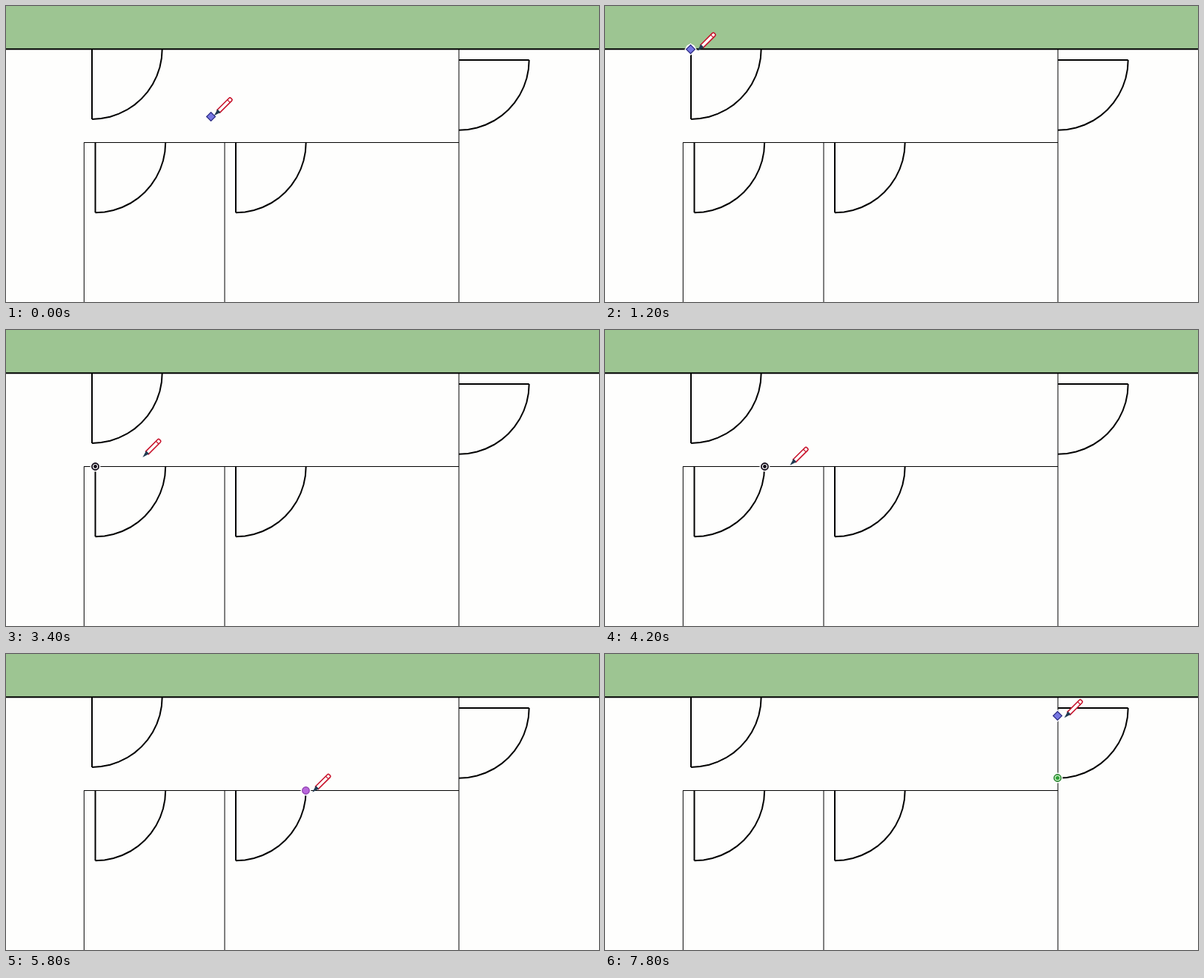
These frames come from a looping animation (800x400 px, 8000 ms). An HTML page with a canvas:

```html
<!DOCTYPE html>
<html lang="en">
<head>
<meta charset="utf-8">
<title>Floor plan doors</title>
<style>
html, body { margin: 0; width: 100%; height: 100%; overflow: hidden; background: #fefefd; }
canvas { display: block; }
</style>
</head>
<body>
<canvas id="stage" width="800" height="400"></canvas>
<script>
const ctx = document.getElementById('stage').getContext('2d');
const LOOP = 8000, STEP = 200;
const RADIUS = 94.7, WALL = 58.2, INNER = 184.5;

// The pencil visits the doors at a steady beat: slide onto the corner, trace the opening, move on.
const FIRST = 900, BEAT = 1950, SLIDE = 150, TRACE = 300, LEAVE = 1050, RUN_UP = 20;

function makeDoor(x, y, snap, sideways = false, traceTime = 450) {
  const far = sideways ? { x, y: y + RADIUS } : { x: x + RADIUS, y };
  const [start, end] = sideways ? [far, { x, y }] : [{ x, y }, far];
  const landing = mix(start, end, RUN_UP / RADIUS);
  return { x, y, snap, sideways, traceTime, start, end, landing };
}

const doors = [
  makeDoor(116, WALL, 'end'),
  makeDoor(120.5, INNER, 'part'),
  makeDoor(310, INNER, 'part'),
  makeDoor(611, 73, 'end', true, 950)
];

function mix(a, b, kx, ky = kx) {
  return { x: a.x + (b.x - a.x) * kx, y: a.y + (b.y - a.y) * ky };
}

function shift(p, dx, dy) {
  return { x: p.x + dx, y: p.y + dy };
}

function ease(u) {
  const k = Math.max(0, Math.min(1, u));
  return k * k * (3 - 2 * k);
}

function line(x1, y1, x2, y2, width = 1, color = '#000') {
  ctx.beginPath();
  ctx.moveTo(x1, y1);
  ctx.lineTo(x2, y2);
  ctx.lineWidth = width;
  ctx.strokeStyle = color;
  ctx.stroke();
}

function disc(r, fill, stroke, width = 1.4) {
  ctx.beginPath();
  ctx.arc(0, 0, r, 0, 2 * Math.PI);
  ctx.fillStyle = fill;
  ctx.fill();
  if (!stroke) return;
  ctx.lineWidth = width;
  ctx.strokeStyle = stroke;
  ctx.stroke();
}

function square(size, fill, stroke) {
  ctx.fillStyle = fill;
  ctx.fillRect(-size / 2, -size / 2, size, size);
  ctx.lineWidth = 1.2;
  ctx.strokeStyle = stroke;
  ctx.strokeRect(-size / 2, -size / 2, size, size);
}

function drawDoor({ x, y, sideways }) {
  const segments = 12;
  line(x, y, sideways ? x + RADIUS : x, sideways ? y : y + RADIUS, 2);
  ctx.beginPath();
  for (let i = 0; i <= segments; i++) {
    const angle = i / segments * Math.PI / 2;
    ctx.lineTo(x + RADIUS * Math.cos(angle), y + RADIUS * Math.sin(angle));
  }
  ctx.stroke();
}

function drawPlan() {
  ctx.fillStyle = '#fefefd';
  ctx.fillRect(0, 0, 800, 400);
  ctx.fillStyle = '#9dc592';
  ctx.fillRect(0, 0, 800, 58);
  line(105, INNER, 611, INNER);
  for (const x of [105.3, 295]) line(x, INNER, x, 400);
  line(611, WALL, 611, 400);
  doors.forEach(drawDoor);
  line(0, WALL, 800, WALL, 2);
}

const markers = {
  end() {
    disc(6.9, '#fff');
    disc(4.7, '#c4ecc0', '#15791c');
    disc(2.5, '#2ea135');
  },
  kept() {
    disc(6.9, '#fff');
    disc(4.5, '#fff', '#120a18', 1.8);
    disc(2.4, '#120a18');
  },
  part() {
    disc(6.9, '#fff');
    disc(4.8, '#b968dc', '#8b3bab', 1.2);
  },
  face() {
    ctx.rotate(Math.PI / 4);
    square(10.5, '#fff', '#fff');
    square(8.4, '#7777e2', '#29297f');
  },
  edge() {
    square(12, '#fff', '#fff');
    square(9.6, '#e58b90', '#a5172a');
  }
};

function drawMarker(kind, { x, y }) {
  ctx.save();
  ctx.translate(Math.ceil(x) - 0.5, Math.ceil(y) - 0.5);
  markers[kind]();
  ctx.restore();
}

function drawPencil({ x, y }) {
  ctx.save();
  ctx.translate(x, y);
  ctx.rotate(-Math.PI / 4);
  ctx.beginPath();
  ctx.roundRect(8, -2.6, 24.5, 5.2, [0, 1.8, 1.8, 0]);
  ctx.fillStyle = '#fff';
  ctx.fill();
  ctx.lineWidth = 1.6;
  ctx.strokeStyle = '#c8142c';
  ctx.stroke();
  line(27.5, -2.6, 27.5, 2.6, 1.2, '#c8142c');
  ctx.beginPath();
  ctx.moveTo(-0.5, 0);
  ctx.lineTo(9, -2.9);
  ctx.lineTo(9, 2.9);
  ctx.fillStyle = '#203b52';
  ctx.fill();
  ctx.restore();
}

// Between doors the pencil swings vertically first, then sideways.
function travel(from, to, u) {
  return mix(from, to, u ** 1.2, 1 - (1 - u) ** 3.2);
}

function drawApproach(u) {
  const point = travel({ x: 277, y: 150 }, doors[0].landing, u);
  drawMarker('face', point);
  drawPencil(shift(point, 4, -2));
}

function drawSlide(door, u) {
  const point = mix(door.landing, door.start, ease(u));
  drawMarker(u < 1 ? 'edge' : door.snap, point);
  drawPencil(u < 1 ? shift(point, 0, 1) : shift(point, 9, 2));
}

function drawTrace(door, u) {
  const bow = 0.16 * (door.end.x - door.start.x) * Math.sin(Math.PI * Math.min(1, u));
  const point = shift(mix(door.start, door.end, ease(u)), 0, -bow);
  if (u < 1) {
    drawMarker(door.snap === 'end' ? 'end' : 'kept', door.start);
    if (door.snap === 'end') drawMarker('face', point);
  } else {
    drawMarker(door.snap, door.end);
  }
  drawPencil(shift(point, 9, 2));
}

function drawTravel(door, next, u) {
  const point = travel(door.end, next.landing, u);
  const { x, y } = door.end;
  if (u < 0.55) {
    ctx.setLineDash([2, 2]);
    line(x, y + 6, x, Math.max(y + 6, point.y - 4), 1, '#8fe09a');
    ctx.setLineDash([]);
    drawMarker('kept', door.end);
  } else {
    drawMarker('face', point);
  }
  drawPencil(shift(point, 4, -2));
}

function draw(t) {
  drawPlan();
  if (t < FIRST) return drawApproach(t / FIRST);
  const index = Math.floor((t - FIRST) / BEAT);
  const phase = (t - FIRST) % BEAT;
  const door = doors[index], next = doors[index + 1];
  if (phase < TRACE) drawSlide(door, phase / SLIDE);
  else if (next && phase >= LEAVE) drawTravel(door, next, (phase - LEAVE) / (BEAT - LEAVE));
  else drawTrace(door, (phase - TRACE) / door.traceTime);
}

const startTime = performance.now();
function tick() {
  const t = (performance.now() - startTime) % LOOP;
  draw(Math.floor(t / STEP) * STEP);
  requestAnimationFrame(tick);
}
tick();
</script>
</body>
</html>
```
